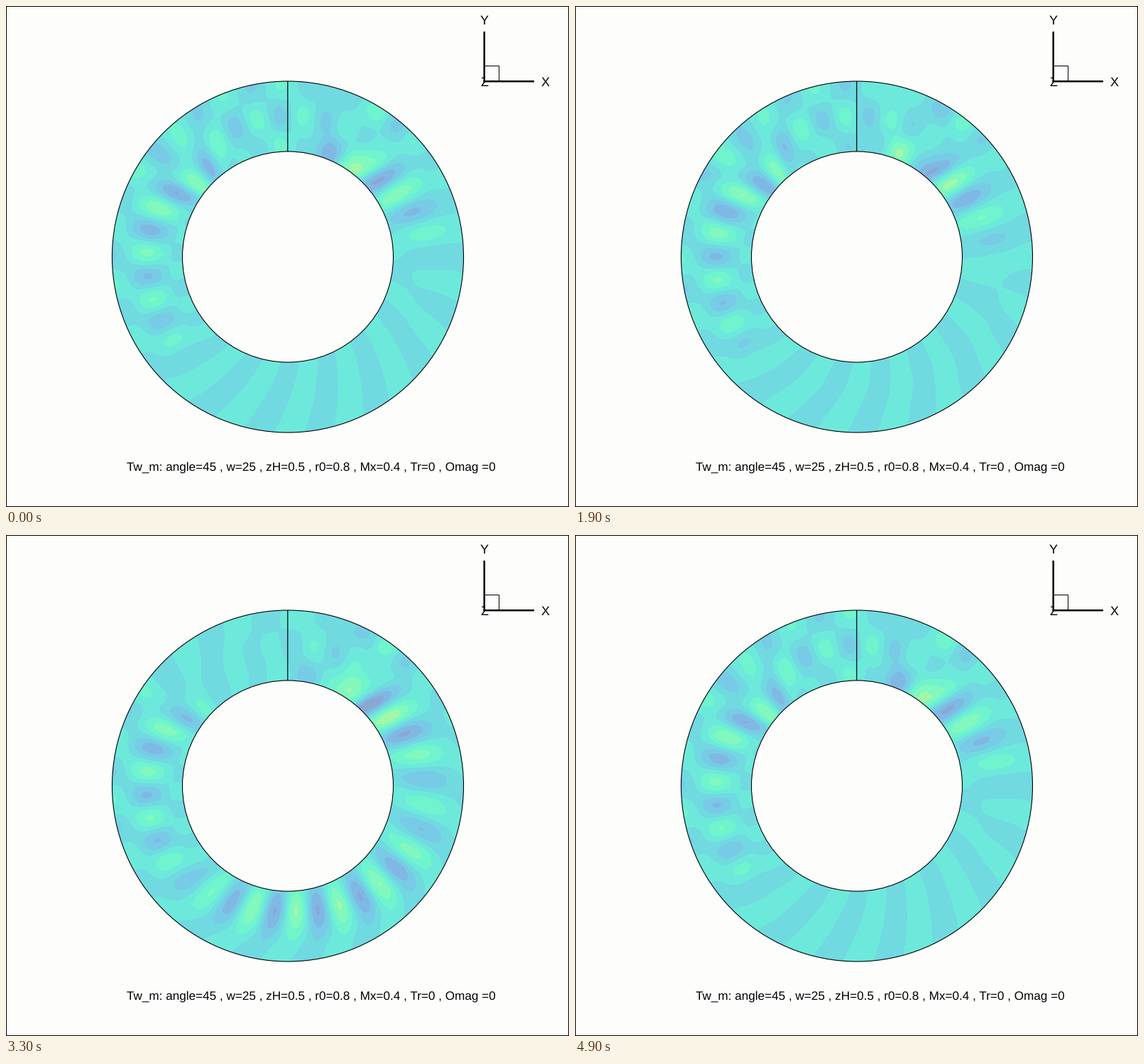
A matplotlib script for the animation above (5000 ms loop, 793x706 px).

```python
import numpy as np
import matplotlib.pyplot as plt
from matplotlib.animation import FuncAnimation
from matplotlib.patches import Circle, Rectangle

W, H, DPI = 793, 706, 64
CX, CY, R_IN, R_OUT = 397, 353.5, 148.5, 247.5
FRAMES, INTERVAL = 50, 100
LAST = 54
CYCLES_PER_STEP = 0.0955
PAPER = "#fdfdfc"

# Snapshots play in name order (1, 10, 11, ... 2, 20 ...), led by the last one.
ORDER = [LAST] + sorted(range(1, LAST + 1), key=str)[1:FRAMES]

COLORS = np.array([
    (138, 168, 212), (128, 184, 228), (119, 203, 230),
    (112, 218, 224), (109, 233, 220), (112, 244, 205),
    (130, 248, 190), (162, 248, 168), (196, 234, 152)]) / 255
LEVELS = np.arange(-3, 5)

plt.rcParams["font.family"] = "Liberation Sans"
plt.rcParams["text.hinting"] = "none"


def sigmoid(v):
    return 1 / (1 + np.exp(-np.clip(v, -40, 40)))


def bell(v, center, width):
    return np.exp(-((v - center) / width) ** 2 / 2)


def hat(v, center, width):
    u = (v - center) / width
    return (1 - u ** 2) * np.exp(-u ** 2 / 2)


def wave(order, degrees):
    return np.exp(1j * order * np.radians(degrees))


def widen_below(degrees, knee, factor):
    return np.where(degrees > knee, degrees, knee - (knee - degrees) / factor)


# Pixel grid over the ring; angles run clockwise from the top.
X0, Y0, SIZE = 146, 103, 502
px, py = np.meshgrid(X0 + 0.5 + np.arange(SIZE), Y0 + 0.5 + np.arange(SIZE))
r = np.hypot(px - CX, py - CY)
ang = np.degrees(np.arctan2(px - CX, CY - py))
turn = ang % 360
from_source = (ang - 45) % 360
coverage = np.clip(R_OUT - r + 0.5, 0, 1) * np.clip(r - R_IN + 0.5, 0, 1)


def left_wave():
    near = bell(ang, -62, 17)
    span = sigmoid((ang + 126) / 5) * sigmoid((32 - ang) / 6)
    center = 200 - 38 * bell(ang, -48, 10)
    amp = 1.8 * span + 1.0 * near
    return amp * hat(r, center, 27 + 14 * near) * wave(19, ang + 32)


def right_wave():
    tilted = ang - 0.1 * (r - 165) * bell(ang, 40, 8)
    warped = widen_below(tilted, 40, 2)
    center = 158 + 38 * np.clip((ang - 40) / 45, 0, 1)
    width = 13 + 14 * np.clip((ang - 15) / 30, 0, 1)
    amp = 3.6 * bell(ang, 46, 29)
    return amp * bell(r, center, width) * wave(-17.3, warped - 60.5)


def rim_wave():
    amp = 1.9 * bell(ang, 33, 18)
    return amp * bell(r, 240, 13) * wave(20, widen_below(ang, 30.5, 1.6) - 30.5)


bottom = np.exp(-((turn - 165) / 62) ** 4)
steady = left_wave() + right_wave() + rim_wave()
ripple = (0.35 + 0.45 * bottom) * wave(18, turn - 191) * np.exp(-0.035j * (r - 170))
side = np.clip(np.abs(turn - 180) / 70, 0, 1)
standing = 2.6 * bottom * bell(r, 176 + 24 * side, 25) * wave(18.3, turn - 186).real


def field(n):
    tau = 2 * np.pi * CYCLES_PER_STEP * (n - LAST)
    front = np.maximum(sigmoid((65 * n + 5 - from_source) / 8),
                       sigmoid((12 * n - 360 + from_source) / 8))
    fade = np.exp(-(n - 4) / 12) * np.cos(2 * np.pi * CYCLES_PER_STEP * (n - 10))
    moving = ((steady * front + ripple) * np.exp(-1j * tau)).real
    return moving + standing * front * fade


def ring_image(n):
    rgb = COLORS[np.digitize(field(n), LEVELS)]
    return np.dstack([rgb, coverage])


def points(pixels):
    return pixels * 72 / DPI


fig = plt.figure(figsize=(W / DPI, H / DPI), dpi=DPI, facecolor=PAPER)
ax = fig.add_axes([0, 0, 1, 1])
ax.axis("off")


def line(xs, ys, width):
    ax.plot(xs, ys, color="black", lw=points(width), solid_capstyle="butt",
            snap=False, zorder=4)


def box(x, y, w, h, fill="none", zorder=3):
    ax.add_patch(Rectangle((x, y), w, h, fc=fill, ec="black", lw=points(1),
                           snap=False, zorder=zorder))


def label(x, y, text, size, **kw):
    ax.text(x, y, text, fontsize=points(size), color="black", va="baseline", **kw)


ring = ax.imshow(ring_image(ORDER[0]), extent=(X0, X0 + SIZE, Y0 + SIZE, Y0),
                 interpolation="nearest", aspect="auto", zorder=1)
ax.set(xlim=(0, W), ylim=(H, 0))
for radius in (R_IN, R_OUT):
    ax.add_patch(Circle((CX, CY), radius, fill=False, ec="black", lw=points(1.1), zorder=3))
line([396.8, 396.8], [106, 205], 1.2)
box(0.5, 0.5, W - 1, H - 1)

label(673.3, 26.5, "Y", 18, ha="center")
label(759.5, 112.8, "X", 18, ha="center")
label(674, 113, "Z", 18, ha="center", zorder=2)
box(673.5, 84.5, 21, 21.5, fill=PAPER)
line([673.7, 673.7], [36, 107.2], 2.5)
line([672.5, 744], [106.2, 106.2], 2.5)

label(170, 654, "Tw_m: angle=45 , w=25 , zH=0.5 , r0=0.8 , Mx=0.4 , Tr=0 , Omag =0", 17.1)


def update(i):
    ring.set_data(ring_image(ORDER[i]))
    return [ring]


anim = FuncAnimation(fig, update, frames=FRAMES, interval=INTERVAL,
                     repeat=True, repeat_delay=0, blit=False)
plt.show()
```
